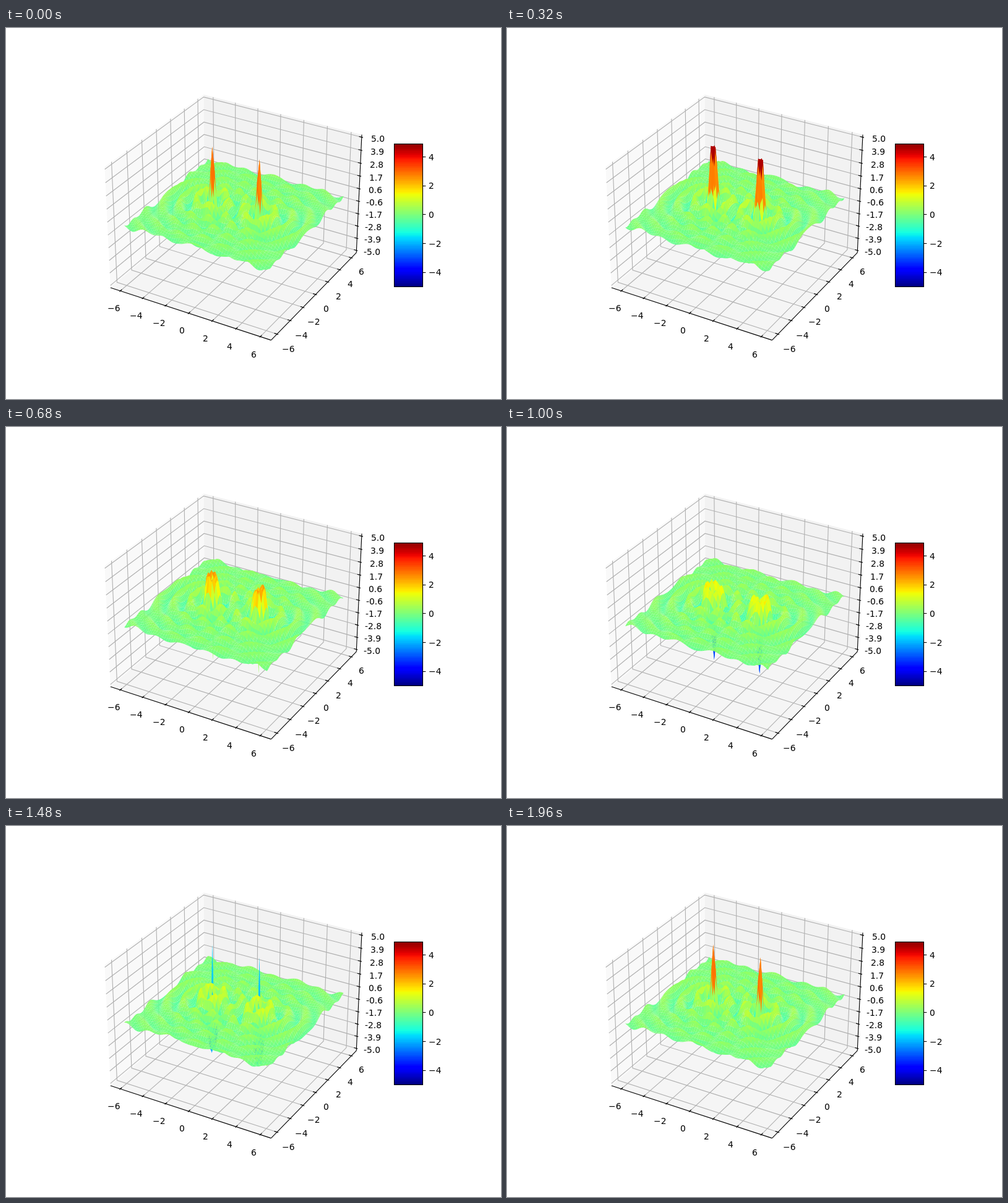
An HTML page with a canvas that plays this animation: 800x600 px, repeating every 2000 ms.

```html
<!DOCTYPE html>
<html lang="en">
<head>
<meta charset="utf-8">
<title>Two-source wave interference</title>
<style>
html, body { margin: 0; width: 100%; height: 100%; overflow: hidden; background: #fff; }
canvas { display: block; }
</style>
</head>
<body>
<canvas id="stage" width="800" height="600"></canvas>
<script>
const ctx = document.getElementById('stage').getContext('2d');

const FRAME_MS = 40, FRAMES = 50;
const CELLS = 60, SPAN = 6;             // surface covers -6..6 in x and y
const SOURCE = 2, WAVE = 5, ZMAX = 5;   // sources at x = -2 and x = 2
const LIM = 6.6;                        // axis limit in x and y
const E = LIM * 25 / 24, EZ = ZMAX * 25 / 24;  // pane edges
const LINE = 1.11;

const clamp = (v, lo = 0, hi = 1) => Math.min(hi, Math.max(lo, v));

// Camera: elevation 30°, azimuth -60°, distance 10
const S3 = Math.sqrt(3);
function project(x, y, z) {
  x *= 4 / 7 / LIM;
  y *= 4 / 7 / LIM;
  z *= 3 / 7 / ZMAX;
  const depth = 10 - (S3 / 4 * x - 0.75 * y + z / 2);
  const scale = 2497.3 / depth;
  return [
    371.24 + scale * (S3 / 2 * x + y / 2),
    296.76 - scale * (-x / 4 + S3 / 4 * y + S3 / 2 * z),
    1 / depth
  ];
}

function jet(value) {
  const v = clamp((value + ZMAX) / (2 * ZMAX));
  const r = Math.min(clamp((v - 0.35) / 0.31), 1 - 0.5 * clamp((v - 0.89) / 0.11));
  const g = Math.min(clamp((v - 0.125) / 0.25), clamp((0.91 - v) / 0.27));
  const b = Math.min(0.5 + 0.5 * clamp(v / 0.11), clamp((0.65 - v) / 0.31));
  return `rgb(${[r, g, b].map(c => Math.round(c * 255))})`;
}

function trace(points) {
  ctx.beginPath();
  for (const [x, y] of points) ctx.lineTo(x, y);
}

function line(color, ...points) {
  trace(points.map(p => project(...p)));
  ctx.strokeStyle = color;
  ctx.lineWidth = LINE;
  ctx.stroke();
}

function pane(color, ...points) {
  trace(points.map(p => project(...p)));
  ctx.closePath();
  ctx.fillStyle = color;
  ctx.fill();
}

// Label centred below a point
function label(text, point) {
  const [x, y] = project(...point);
  const left = x - ctx.measureText(text).width / 2;
  ctx.fillText(text, Math.round(left), Math.round(y + 10.6));
}

const signed = v => String(v).replace('-', '\u2212');

function drawAxes() {
  pane('#f9f9f9', [-E, -E, -EZ], [-E, E, -EZ], [-E, E, EZ], [-E, -E, EZ]);
  pane('#f2f2f2', [-E, E, -EZ], [E, E, -EZ], [E, E, EZ], [-E, E, EZ]);
  pane('#f5f5f5', [-E, -E, -EZ], [E, -E, -EZ], [E, E, -EZ], [-E, E, -EZ]);

  const ticks = [-6, -4, -2, 0, 2, 4, 6];
  const levels = Array.from({ length: 10 }, (_, i) => -ZMAX + i * 2 * ZMAX / 9);
  const grid = '#b0b0b0';
  for (const t of ticks) {
    line(grid, [t, -E, -EZ], [t, E, -EZ], [t, E, EZ]);
    line(grid, [E, t, -EZ], [-E, t, -EZ], [-E, t, EZ]);
  }
  for (const z of levels) line(grid, [-E, -E, z], [-E, E, z], [E, E, z]);

  line('#000', [-E, -E, -EZ], [E, -E, -EZ]);
  line('#000', [E, -E, -EZ], [E, E, -EZ]);
  line('#000', [E, E, -EZ], [E, E, EZ]);

  const inner = E - 0.22, outer = E + 0.11;
  const far = E + 0.913, low = -EZ - 0.691;
  ctx.fillStyle = '#000';
  for (const t of ticks) {
    line('#000', [t, -inner, -EZ], [t, -outer, -EZ]);
    line('#000', [inner, t, -EZ], [outer, t, -EZ]);
    label(signed(t), [t, -far, low]);
    label(signed(t), [far, t, low]);
  }
  for (const z of levels) {
    line('#000', [inner, E, z], [outer, E, z]);
    label(z.toFixed(1), [far, far, z]);
  }
}

function drawColorbar() {
  const left = 627, right = 673.5, bottom = 418.5, height = 231, bands = 99;
  const yOf = v => bottom - (v + ZMAX) / 9.9 * height;
  for (let i = 0; i < bands; i++) {
    const v = -ZMAX + i / 10;
    const top = Math.round(yOf(v + 0.1));
    ctx.fillStyle = jet(v + 0.05);
    ctx.fillRect(left, top, 46, Math.round(yOf(v)) - top);
  }
  ctx.strokeStyle = '#000';
  ctx.lineWidth = LINE;
  ctx.strokeRect(left + 0.5, bottom - height, 46, height);
  ctx.fillStyle = '#000';
  for (const v of [-4, -2, 0, 2, 4]) {
    const y = Math.floor(yOf(v)) + 0.5;
    trace([[right, y], [right + 4.86, y]]);
    ctx.stroke();
    ctx.fillText(signed(v), 683, Math.round(yOf(v) + 5.1));
  }
}

function height(x, y, phase) {
  const wave = r => Math.cos(WAVE * r - phase) / r;
  const z = wave(Math.hypot(x + SOURCE, y)) + wave(Math.hypot(x - SOURCE, y));
  return clamp(z, -ZMAX, ZMAX);
}

function drawSurface(phase) {
  const nodes = [];
  for (let j = 0; j <= CELLS; j++) {
    for (let i = 0; i <= CELLS; i++) {
      const x = (i - CELLS / 2) * 2 * SPAN / CELLS;
      const y = (j - CELLS / 2) * 2 * SPAN / CELLS;
      const z = height(x, y, phase);
      nodes.push([...project(x, y, z), z]);
    }
  }
  const mean = (quad, k) => quad.reduce((sum, p) => sum + p[k], 0) / 4;
  const quads = [];
  for (let j = 0; j < CELLS; j++) {
    for (let i = 0; i < CELLS; i++) {
      const n = j * (CELLS + 1) + i, m = n + CELLS + 1;
      const quad = [nodes[n], nodes[n + 1], nodes[m + 1], nodes[m]];
      quads.push({ quad, near: mean(quad, 2), color: jet(mean(quad, 3)) });
    }
  }
  quads.sort((a, b) => a.near - b.near);
  for (const { quad, color } of quads) {
    trace(quad);
    ctx.fillStyle = color;
    ctx.fill();
  }
}

let shown = -1;
function render() {
  const frame = Math.floor(performance.now() / FRAME_MS) % FRAMES;
  if (frame !== shown) {
    shown = frame;
    ctx.fillStyle = '#fff';
    ctx.fillRect(0, 0, 800, 600);
    ctx.font = '13.89px "DejaVu Sans", sans-serif';
    drawAxes();
    drawSurface(2 * Math.PI * frame / (FRAMES - 1));
    drawColorbar();
  }
  requestAnimationFrame(render);
}
render();
</script>
</body>
</html>
```
